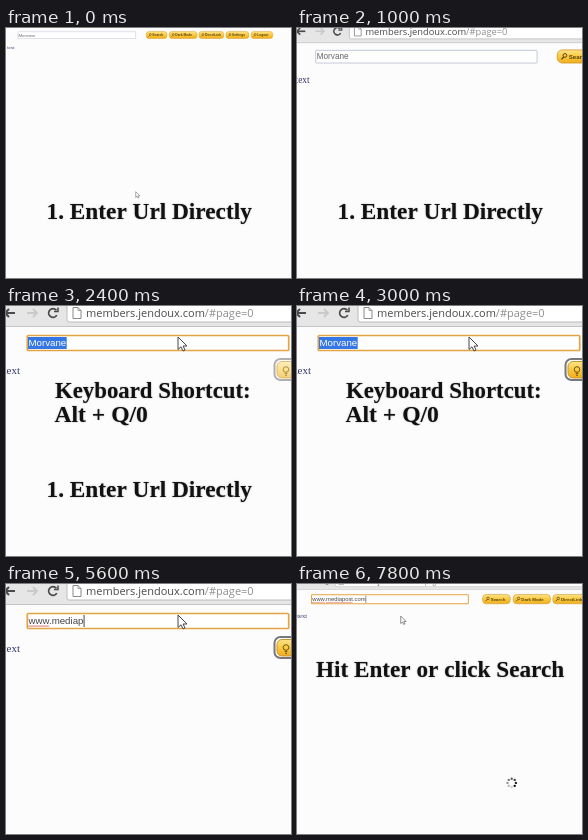
Recreate the animation shown at these times as an HTML page with a canvas. Size 285 by 250 pixels, loop 8000 ms.

```html
<!DOCTYPE html>
<html lang="en">
<head>
<meta charset="utf-8">
<title>Enter a URL directly</title>
<style>
html, body { margin: 0; width: 285px; height: 250px; overflow: hidden; background: #fcfcfc; }
canvas { display: block; width: 285px; height: 250px; }
</style>
</head>
<body>
<canvas id="stage"></canvas>
<script>
const W = 285, H = 250, LOOP = 8000, STEP = 200;
const SANS = '"Liberation Sans", Arial, sans-serif';
const SERIF = '"Liberation Serif", "Times New Roman", serif';
const UI = '"Open Sans", "Noto Sans", sans-serif';
const PLACEHOLDER = 'Morvane';
const ADDRESS = 'www.mediapost.com';
const BUTTONS = [
  [306, 47, 'Search'], [357, 63, 'Dark Mode'], [423, 56, 'DirectLink'],
  [483, 52, 'Settings'], [539, 49, 'Logout']
];

const canvas = document.getElementById('stage');
const ctx = canvas.getContext('2d');
const dpr = window.devicePixelRatio || 1;
canvas.width = W * dpr;
canvas.height = H * dpr;

const clamp = v => Math.max(0, Math.min(1, v));
const ramp = (t, from, to) => clamp((t - from) / (to - from));
const mix = (a, b, k) => a + (b - a) * k;

function text(str, x, y, font, color) {
  ctx.font = font;
  ctx.fillStyle = color;
  ctx.fillText(str, x, y);
}

function box(x, y, w, h, r, fill, stroke, line = 1) {
  ctx.beginPath();
  ctx.roundRect(x, y, w, h, r);
  if (fill) { ctx.fillStyle = fill; ctx.fill(); }
  if (stroke) { ctx.strokeStyle = stroke; ctx.lineWidth = line; ctx.stroke(); }
}

function path(points, color, width, close) {
  ctx.beginPath();
  points.forEach(([x, y]) => ctx.lineTo(x, y));
  if (close) ctx.closePath();
  ctx.strokeStyle = color;
  ctx.lineWidth = width;
  ctx.stroke();
}

function ring(x, y, r, color, width, from = 0, to = Math.PI * 2) {
  ctx.beginPath();
  ctx.arc(x, y, r, from, to);
  ctx.strokeStyle = color;
  ctx.lineWidth = width;
  ctx.stroke();
}

function gold(y, h) {
  const g = ctx.createLinearGradient(0, y, 0, y + h);
  g.addColorStop(0, '#ffe48a');
  g.addColorStop(0.5, '#fbc83e');
  g.addColorStop(1, '#f0ad1c');
  return g;
}

function zoom(t) {
  if (t > 7000) return 1 - 0.1 * (t - 7000) / STEP;
  return Math.min(1, 0.45 + 0.0794 * t / STEP);
}

function arrow(x, dir, color) {
  path([[x - 5 * dir, 7], [x + 5 * dir, 7]], color, 2);
  path([[x + dir, 3], [x + 5 * dir, 7], [x + dir, 11]], color, 2);
}

function toolbar() {
  ctx.fillStyle = '#e6e6e6';
  ctx.fillRect(-20, -40, 800, 60);
  ctx.fillStyle = '#c4c4c4';
  ctx.fillRect(-20, 20, 800, 1);
  box(61, -5, 700, 21, 2, '#fff', '#bcbcbc');
  arrow(4, -1, '#4a4a4a');
  arrow(26, 1, '#cacaca');
  ring(47, 7, 4.3, '#4a4a4a', 1.8, 0.5, 5.6);
  path([[48, 5.5], [52, 5.5], [52, 1.5]], '#4a4a4a', 1.5);
  path([[67, 1.5], [72, 1.5], [75, 4.5], [75, 12.5], [67, 12.5]], '#888', 1, true);
  path([[72, 1.5], [72, 4.5], [75, 4.5]], '#888', 0.8);
  const font = '11px ' + UI, host = 'members.jendoux.com';
  text(host, 80, 11, font, '#4a4a4a');
  text('/#page=0', 80 + ctx.measureText(host).width, 11, font, '#8d8d8d');
}

function squiggle(x, end) {
  const points = [];
  for (let i = 0; x + i <= end; i++) points.push([x + i, 42 + (i % 2 ? 0.7 : -0.5)]);
  path(points, '#d96a6a', 0.9);
}

function field(t) {
  const focus = t >= 2000, font = '9.7px ' + SANS;
  box(21.3, 29.5, 261.4, 15, 1, '#fff', focus ? '#e3a443' : '#b9bfd0', focus ? 1.7 : 1);
  ctx.font = font;
  if (t < 3400) {
    if (focus) {
      ctx.fillStyle = '#3577e5';
      ctx.fillRect(22, 31, ctx.measureText(PLACEHOLDER).width + 1, 12);
    }
    text(PLACEHOLDER, 22.5, 40.2, font, focus ? '#fff' : '#666');
    return;
  }
  // Typing pauses after "www." and after "m".
  const count = t < 4400 ? Math.min(4, 1 + (t - 3400) / STEP)
    : t < 4800 ? 5 : Math.min(17, 6 + (t - 4800) / STEP);
  const typed = ADDRESS.slice(0, count);
  text(typed, 22.5, 40.2, font, '#444');
  const at = n => 22.5 + ctx.measureText(ADDRESS.slice(0, n)).width;
  if (count >= 4) squiggle(22, at(3));
  if (count >= 14) squiggle(at(4), at(13));
  ctx.fillStyle = '#333';
  ctx.fillRect(at(count) + 0.2, 31, 0.9, 12);
}

function buttons() {
  for (const [x, w, label] of BUTTONS) {
    box(x + 0.5, 29, w - 1, 15.5, 6, gold(29, 15.5), '#d39a2c');
    ring(x + 9.5, 35.5, 2.2, '#4a3a10', 1.1);
    path([[x + 8, 37.5], [x + 5.5, 40]], '#4a3a10', 1.4);
    text(label, x + 14, 39.5, 'bold 7.3px ' + SANS, '#55440f');
  }
}

function pointerAt(t) {
  if (t < 1400) return [283, 385];
  if (t < 7200) {
    const k = ramp(t, 1400, 2000);
    return [mix(290, 172, k), mix(190, 31, k)];
  }
  return [170, mix(31, 65, ramp(t, 7200, 7800))];
}

function pointer([x, y]) {
  const shape = [[0, 0], [0, 12.5], [3, 9.8], [5, 14], [7, 13], [5.1, 9], [9, 9]];
  ctx.beginPath();
  shape.forEach(([dx, dy]) => ctx.lineTo(x + dx, y + dy));
  ctx.closePath();
  ctx.fillStyle = '#fff';
  ctx.fill();
  ctx.strokeStyle = '#444';
  ctx.lineWidth = 1;
  ctx.stroke();
}

function spinner(t) {
  const turn = t / STEP + 3;
  for (let i = 0; i < 8; i++) {
    const a = (i + turn) * Math.PI / 4;
    const shade = 205 - i * 28;
    ctx.beginPath();
    ctx.arc(355 + 7 * Math.cos(a), 343 + 7 * Math.sin(a), 2, 0, Math.PI * 2);
    ctx.fillStyle = `rgb(${shade},${shade},${shade})`;
    ctx.fill();
  }
}

function bulbButton(alpha) {
  if (!alpha) return;
  ctx.globalAlpha = alpha;
  box(268.5, 53, 40, 21, 6, '#fff', '#77777d', 2);
  box(271, 55.5, 40, 16.5, 5, gold(55.5, 16.5), '#c9952c');
  ring(280, 63.5, 2.8, '#6b5517', 1);
  path([[278.7, 67.5], [281.3, 67.5]], '#6b5517', 1);
  path([[279, 69.3], [281, 69.3]], '#6b5517', 1);
  ctx.globalAlpha = 1;
}

function caption(str, x, y, size, alpha) {
  if (!alpha) return;
  ctx.save();
  ctx.globalAlpha = alpha;
  ctx.shadowColor = 'rgba(0,0,0,.4)';
  ctx.shadowBlur = 1.5 * dpr;
  text(str, x, y, `bold ${size}px ${SERIF}`, '#111');
  ctx.restore();
}

function draw(time) {
  const t = Math.floor(time % LOOP / STEP) * STEP;
  const s = zoom(t);
  ctx.setTransform(dpr, 0, 0, dpr, 0, 0);
  ctx.fillStyle = '#fcfcfc';
  ctx.fillRect(0, 0, W, H);

  ctx.save();
  ctx.translate(4.3 * (1 - s), -17.3 * (1 - s));
  ctx.scale(s, s);
  toolbar();
  field(t);
  buttons();
  text('text', -2.5, 67.5, '11px ' + SERIF, '#30386f');
  if (t >= 7200) spinner(t);
  pointer(pointerAt(t));
  ctx.restore();

  const end = ramp(t, 6400, 7000);
  bulbButton(ramp(t, 1600, 3000) * (1 - end));
  caption('1. Enter Url Directly', 40.5, 191, 23.3, 1 - ramp(t, 2400, 3000));
  const keys = ramp(t, 1400, 2000) * (1 - ramp(t, 3200, 3800));
  caption('Keyboard Shortcut:', 49, 92, 22.8, keys);
  caption('Alt + Q/0', 48.5, 116, 23.6, keys);
  caption('Hit Enter or click Search', 19, 93, 23.2, end);
}

const start = performance.now();
function tick() {
  draw(performance.now() - start);
  requestAnimationFrame(tick);
}
tick();
</script>
</body>
</html>
```
